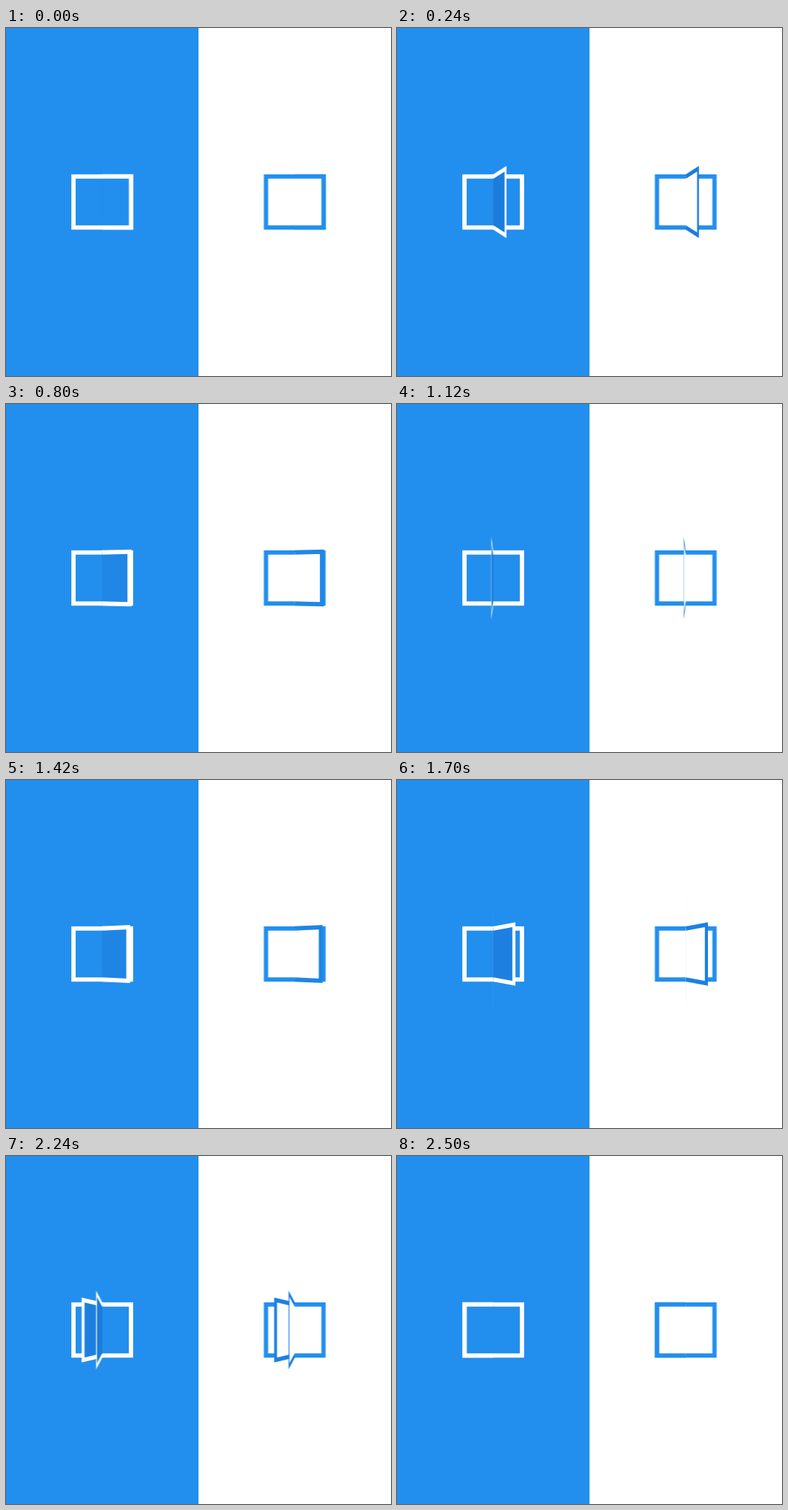
An HTML page without scripts for the animation above (2600 ms loop, 530 px wide and 480 px high).

```html
<!DOCTYPE html>
<html lang="en">
<head>
<meta charset="utf-8">
<title>Book loader</title>
<style>
  :root {
    --blue: #228fee;
    --shade: #1c7bdb;
    --loop: 2600ms;
    --closed: path("M0 -35.2 L39.6 -35.2 L39.6 35.2 L0 35.2");
    --raised: path("M0 -35.2 L39.6 -53.6 L39.6 53.6 L0 35.2");
  }
  html, body { margin: 0; height: 100%; overflow: hidden; background: #fff; }
  svg { display: block; width: 530px; height: 480px; }
  rect, path { stroke-width: 5.9; }

  .dark { fill: var(--blue); stroke: #fff; }
  .light { fill: #fff; stroke: var(--blue); }
  .dark path { fill: currentColor; }
  .light path { stroke: currentColor; }

  path {
    color: var(--blue);
    stroke-miterlimit: 10;
    animation-duration: var(--loop);
    animation-delay: calc(var(--at) - var(--loop));
    animation-iteration-count: infinite;
  }
  .lift path { animation-name: lift, lift-shade; }
  .land path { animation-name: land, land-shade; }

  /* right side: page rises to the middle, then stays edge-on (invisible) */
  @keyframes lift {
    0% {
      d: path("M0 -35.2 L39.6 -35.2 L39.6 35.2 L0 35.2");
      transform: scaleX(1);
      animation-timing-function: cubic-bezier(.299, .053, .651, .524);
    }
    13.64%, 100% {
      d: path("M0 -35.2 L39.6 -53.6 L39.6 53.6 L0 35.2");
      transform: scaleX(0);
    }
  }
  @keyframes lift-shade {
    0% { color: var(--blue); animation-timing-function: cubic-bezier(.1, .5, .5, 1); }
    13.64%, 100% { color: var(--shade); }
  }

  /* left side, mirrored: page falls from the middle and merges with the cover */
  @keyframes land {
    0%, 13.64% {
      d: path("M0 -35.2 L39.6 -53.6 L39.6 53.6 L0 35.2");
      transform: scaleX(0);
      animation-timing-function: cubic-bezier(.351, .427, .699, .858);
    }
    25.77% {
      d: path("M0 -35.2 L39.6 -35.2 L39.6 35.2 L0 35.2");
      transform: scaleX(-1);
      animation-timing-function: step-start;
    }
    25.78%, 100% {
      d: path("M0 -35.2 L39.6 -35.2 L39.6 35.2 L0 35.2");
      transform: scaleX(0);
    }
  }
  @keyframes land-shade {
    0%, 13.64% { color: var(--shade); animation-timing-function: cubic-bezier(.5, 0, .9, .5); }
    25.77%, 100% { color: var(--blue); }
  }

  .p1 { --at: 0ms; }
  .p2 { --at: 750ms; }
  .p3 { --at: 1345ms; }
  .p4 { --at: 1550ms; }
  .p5 { --at: 1705ms; }
  .p6 { --at: 1835ms; }
</style>
</head>
<body>
<svg viewBox="0 0 530 480">
  <rect width="265" height="480" fill="#228fee"/>

  <g class="dark" transform="translate(132.5 240)">
    <rect x="-39.6" y="-35.2" width="79.2" height="70.4"/>
    <g class="lift">
      <path class="p6"/><path class="p5"/><path class="p4"/>
      <path class="p3"/><path class="p2"/><path class="p1"/>
    </g>
    <g class="land">
      <path class="p1"/><path class="p2"/><path class="p3"/>
      <path class="p4"/><path class="p5"/><path class="p6"/>
    </g>
  </g>

  <g class="light" transform="translate(397.5 240)">
    <rect x="-39.6" y="-35.2" width="79.2" height="70.4"/>
    <g class="lift">
      <path class="p6"/><path class="p5"/><path class="p4"/>
      <path class="p3"/><path class="p2"/><path class="p1"/>
    </g>
    <g class="land">
      <path class="p1"/><path class="p2"/><path class="p3"/>
      <path class="p4"/><path class="p5"/><path class="p6"/>
    </g>
  </g>
</svg>
</body>
</html>
```
